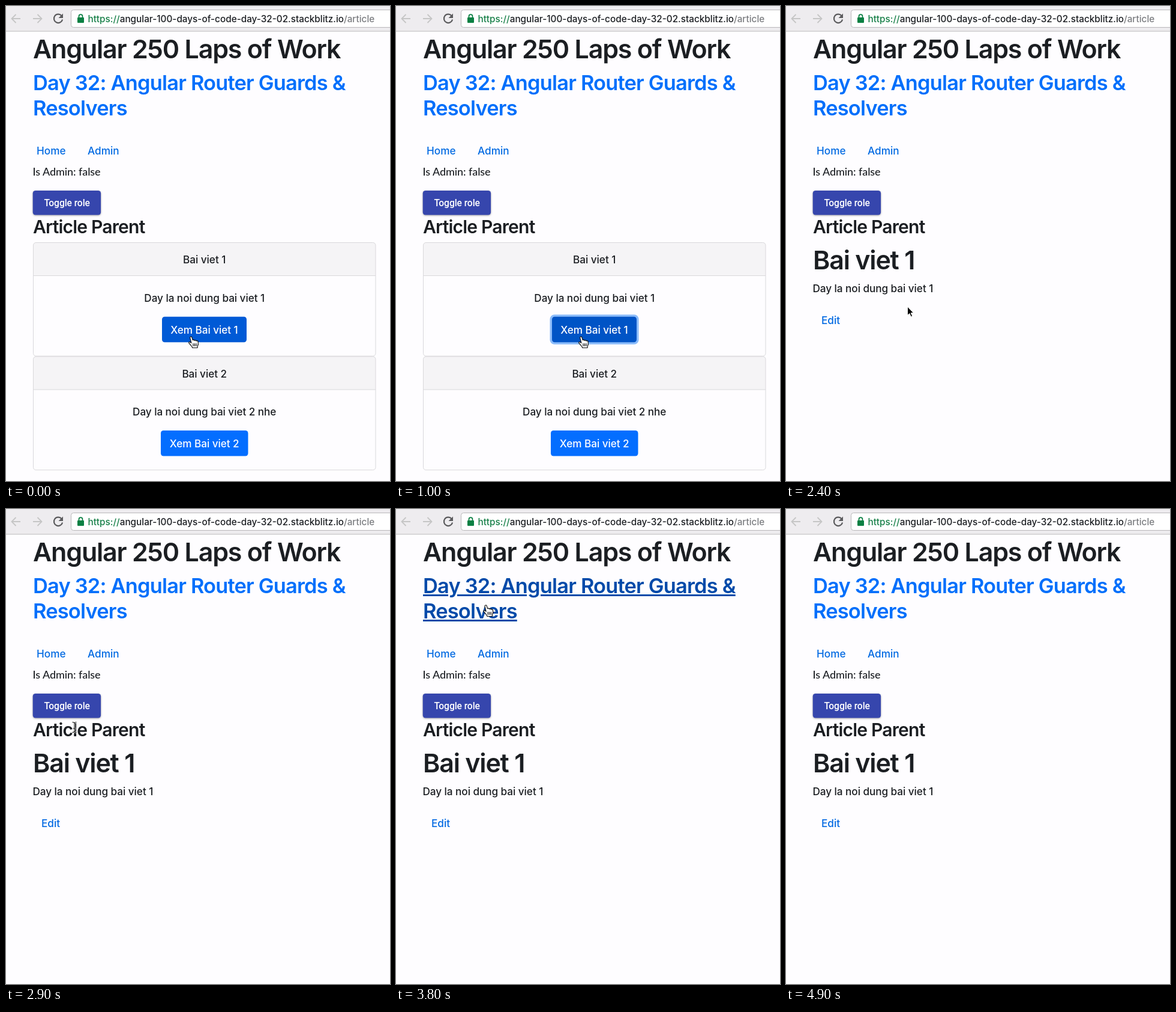
An HTML page that plays this animation: 640x790 px, repeating every 5 s.

```html
<!DOCTYPE html>
<html lang="en">
<head>
<meta charset="utf-8">
<title>Router guards demo</title>
<style>
html, body { margin: 0; width: 100%; height: 100%; overflow: hidden; background: #fefdff; }
svg, .title { position: absolute; left: 0; top: 0; }
svg { display: block; }
text, .title { font-family: Inter, "Open Sans", sans-serif; }
text { font-size: 17.2px; font-weight: 450; letter-spacing: -.004em; fill: #1b1e22; white-space: pre; }
.h1, .h3, .title { font-weight: 560; }
.h1, .h3 { letter-spacing: -.028em; }
.h1 { font-size: 43px; }
.h3 { font-size: 30.1px; }
.mid { text-anchor: middle; }
.link { fill: #0069e2; letter-spacing: 0; }
.on { fill: #fff; }
.url { font-size: 15.3px; letter-spacing: 0; }
.title {
  left: 45px; top: 106.6px; width: 580px;
  font-size: 34.4px; line-height: 42.7px; letter-spacing: -.023em; color: #006ffb;
}
.title.hover {
  color: #004aa9; text-decoration: underline;
  text-decoration-thickness: 2.6px; text-underline-offset: 2px;
}
.card { fill: none; stroke: #d9d8db; }
.head { fill: #f5f4f6; }
.toggle { fill: #3646ad; filter: drop-shadow(0 1.5px 1.5px rgba(0, 0, 0, .34)); }
.nav { fill: none; stroke: #c6c6c6; stroke-width: 1.8; }
</style>
</head>
<body>
<svg width="640" height="790" viewBox="0 0 640 790">
  <rect width="640" height="42" fill="#eeecef"/>
  <path d="M0 42H640" stroke="#bab9bb"/>
  <rect x="108.5" y="6.5" width="560" height="29" rx="4" fill="#fff" stroke="#b9b8ba"/>
  <path class="nav" d="M24 21H10M16.5 14L9.5 21L16.5 28M45 21H59M52.5 14L59.5 21L52.5 28"/>
  <path d="M92.6 16.2A7.2 7.2 0 1 0 94.1 22.5" fill="none" stroke="#5b5b5d" stroke-width="2.2"/>
  <path d="M95 12.5V20H87.5Z" fill="#5b5b5d"/>
  <rect x="119" y="19" width="11" height="9" rx="1" fill="#0b8043"/>
  <path d="M121.5 19.5V17.2A3 3 0 0 1 127.5 17.2V19.5" fill="none" stroke="#0b8043" stroke-width="1.8"/>
  <text class="url" x="136.5" y="27"><tspan fill="#188049">https://</tspan><tspan>angular-100-days-of-code-day-32-02.stackblitz.io</tspan><tspan fill="#7b7d80">/article</tspan></text>

  <text class="h1" x="45" y="87">Angular 250 Laps of Work</text>
  <text class="link" x="51" y="246.5">Home</text>
  <text class="link" x="136" y="246.5">Admin</text>
  <text x="44.5" y="282.3" style="font: 500 18px Lato, sans-serif">Is Admin: false</text>
  <rect class="toggle" x="44.7" y="307" width="113.4" height="40.5" rx="4.5"/>
  <text class="on mid" x="101.7" y="333" style="font: 500 15.6px Roboto, sans-serif">Toggle role</text>
  <text class="h3" x="45" y="377.7">Article Parent</text>

  <g id="list">
    <path class="head" d="M45.5 448.5V398Q45.5 393.5 50 393.5H611.5Q616 393.5 616 398V448.5Z"/>
    <rect class="card" x="45.5" y="393.5" width="570.5" height="188.7" rx="4.5"/>
    <path class="card" d="M45.5 448.5H616"/>
    <text class="mid" x="330.7" y="428">Bai viet 1</text>
    <text class="mid" x="330.7" y="491.8">Day la noi dung bai viet 1</text>
    <rect id="ring" x="256.5" y="513.2" width="148" height="49.6" rx="7.5" fill="#8bbcfb"/>
    <rect id="view" x="260" y="516.7" width="141" height="42.6" rx="4.5"/>
    <text class="on mid" x="330.5" y="544.5">Xem Bai viet 1</text>

    <path class="head" d="M45.5 638V587.5Q45.5 583 50 583H611.5Q616 583 616 587.5V638Z"/>
    <rect class="card" x="45.5" y="583" width="570.5" height="188.7" rx="4.5"/>
    <path class="card" d="M45.5 638H616"/>
    <text class="mid" x="330.7" y="617.5">Bai viet 2</text>
    <text class="mid" x="330.7" y="681.3">Day la noi dung bai viet 2 nhe</text>
    <rect x="258" y="706" width="145.5" height="42.5" rx="4.5" fill="#046eff"/>
    <text class="on mid" x="330.7" y="734">Xem Bai viet 2</text>
  </g>

  <text id="loading" x="44.5" y="413.3">Loading...</text>

  <g id="article">
    <text class="h1" x="45" y="437.5">Bai viet 1</text>
    <text x="44.5" y="476.2">Day la noi dung bai viet 1</text>
    <text class="link" x="59" y="528.7">Edit</text>
  </g>
</svg>

<div class="title" id="title">Day 32: Angular Router Guards &amp;<br>Resolvers</div>

<svg width="640" height="790" viewBox="0 0 640 790">
  <defs>
    <path id="stem" fill="none" d="M-3.5 -8.5Q0 -8.5 0 -6.5Q0 -8.5 3.5 -8.5M0 -6.5V6.5M-3.5 8.5Q0 8.5 0 6.5Q0 8.5 3.5 8.5M-2.2 2H2.2"/>
  </defs>
  <g id="cursor">
    <g id="hand" stroke="#111" stroke-width="1.2" stroke-linejoin="round" stroke-linecap="round">
      <path fill="#fff" d="M-3 1.2C-3.2 -.8 -.2 -1.2 .3 .8L1.5 5.2C2.2 4.2 4.2 4.4 4.4 5.8C5.2 4.9 7 5.2 7.3 6.5C8.3 5.8 10.3 6.4 10.5 8C11 10.5 10.8 13 9.5 15.5L9.3 18H.8L.5 16.5C-1 14.5 -2.5 12.5 -4.5 10.5C-5.8 9 -4.5 7.8 -3 8.4L-.9 9.8Z"/>
      <path d="M2.3 11V15M4.8 11V15M7.3 11V15"/>
    </g>
    <path id="arrow" fill="#000" stroke="#fff" d="M0 0V14.5L3.4 11.4L5.8 16.8L8.2 15.8L5.8 10.6H10.2Z"/>
    <g id="beam">
      <use href="#stem" stroke="#fff" stroke-width="2.6"/>
      <use href="#stem" stroke="#111" stroke-width="1.1"/>
    </g>
  </g>
</svg>

<script>
const LOOP = 5000, STEP = 100;
const $ = id => document.getElementById(id);
const show = (id, on) => { $(id).style.display = on ? "" : "none"; };

// time, x, y of the pointer's hot spot
const path = [
  [0, 309.7, 550.5], [2000, 309.7, 550.5], [2400, 202.5, 500],
  [2900, 114, 363], [3600, 114, 363], [3700, 128, 270],
  [3800, 151, 160.5], [3900, 170, 78], [4000, 184, 28], [4200, 194, -3]
];
// time, pointer shape
const shapes = [
  [0, "hand"], [2100, "arrow"], [2800, "beam"], [3700, "arrow"],
  [3800, "hand"], [3900, "beam"], [4000, "arrow"], [4300, "none"]
];

const current = (rows, t) => rows.filter(r => r[0] <= t).pop();
const ease = u => u * u * (3 - 2 * u);

function place(t) {
  const a = current(path, t);
  const b = path[path.indexOf(a) + 1] || a;
  const u = a === b ? 0 : ease((t - a[0]) / (b[0] - a[0]));
  return [1, 2].map(i => a[i] + (b[i] - a[i]) * u);
}

function draw(t) {
  const shape = current(shapes, t)[1];
  show("list", t < 1100);
  show("loading", t >= 1100 && t < 2000);
  show("article", t >= 2000);
  show("ring", t >= 800);
  $("view").setAttribute("fill", t >= 800 ? "#0054c6" : "#005ad6");
  $("title").classList.toggle("hover", t >= 3800 && t < 3900);
  for (const id of ["hand", "arrow", "beam"]) show(id, id === shape);
  $("cursor").setAttribute("transform", `translate(${place(t)})`);
}

const start = performance.now();
function tick() {
  const t = (performance.now() - start) % LOOP;
  draw(Math.floor(t / STEP) * STEP);
  requestAnimationFrame(tick);
}
tick();
</script>
</body>
</html>
```
